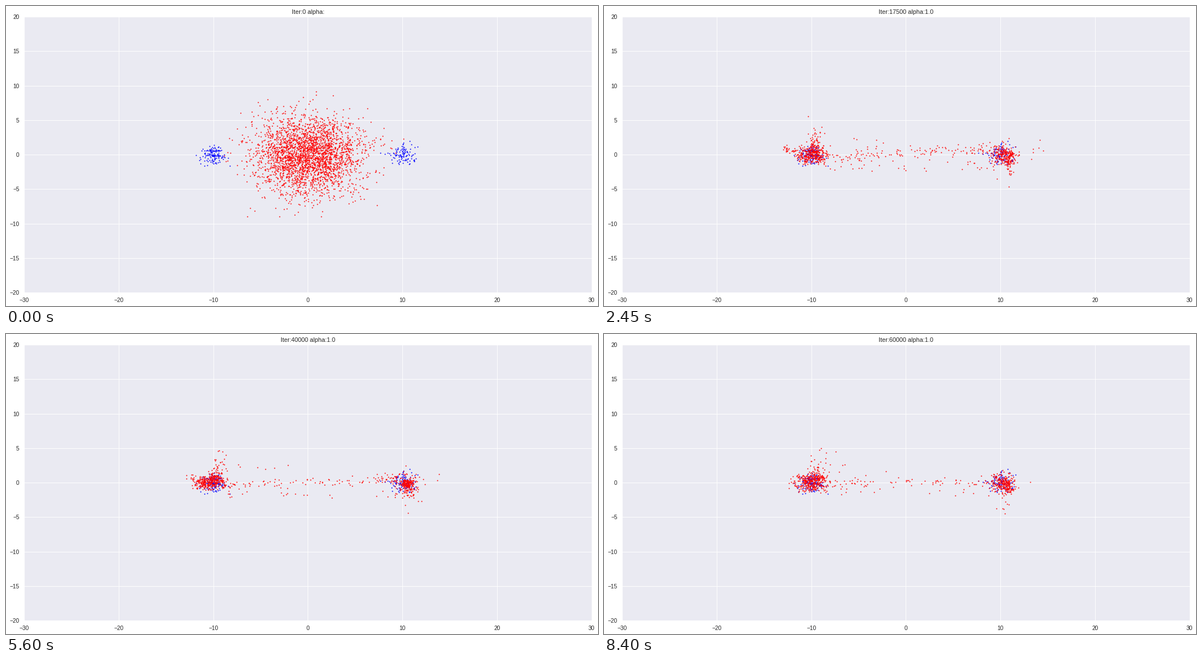
Animation of 1050 by 533 pixels, one loop 8.47 s. Source, as a matplotlib script:

```python
import numpy as np
import matplotlib.pyplot as plt
from matplotlib.animation import FuncAnimation

W, H, DPI = 1050, 533, 64
FRAMES, STEP_MS = 121, 70
INK, PANEL = "#262626", "#eaeaf2"

# Shape of the sampled cloud at a few moments; values between are interpolated.
KEYS = [19, 35, 61, 80, 96, 120]
SHAPE = {
    "lx":     [-11.4, -10.0, -10.3, -10.4, -10.3, -10.2],
    "lsx":    [.9, .8, .95, .9, .85, .9],
    "lsy":    [.8, .65, .65, .55, .6, .7],
    "spur_x": [-11.4, -9.7, -9.9, -9.8, -9.8, -9.7],
    "spread": [.75, .35, .5, .4, .45, .6],
    "lean":   [.5, .05, .02, .12, .15, .14],
    "rise":   [1.7, 1.3, 1.15, 1.1, 1.0, 1.05],
    "ltail":  [8, 32, 12, 10, 0, 0],
    "rx":     [10.6, 10.5, 10.7, 10.5, 10.35, 10.4],
    "ry":     [-.2, -.15, -.25, -.1, .05, -.1],
    "core":   [.75, .6, .28, .33, .42, .5],
    "tilt":   [0, -.3, -.1, -.1, 0, -.6],
    "rtail":  [45, 6, 2, 3, 0, 1],
    "mid_n":  [230, 190, 160, 130, 125, 105],
    "mid_y":  [.1, .25, .15, .05, .05, 0],
    "slope":  [-.01, .06, .05, .06, .05, .03],
    "band":   [1.1, .5, .35, .35, .35, .4],
    "low":    [.3, .14, .13, .12, .12, .06],
}


def px(v):
    """Pixels to points."""
    return v * 72 / DPI


def blob(rng, n, cx, cy, sx, sy):
    """Round cluster with a soft limit on its size."""
    z = 2.6 * np.tanh(rng.normal(size=(2, n)) / 2.4)
    return np.array([cx + sx * z[0], cy + sy * z[1]])


def left_part(rng, p):
    body = blob(rng, 290, p["lx"], 0, p["lsx"], p["lsy"])
    up = rng.exponential(p["rise"], 105)
    up = np.where(up > 5.4, up / 2, up)
    spur = [p["spur_x"] + p["lean"] * up + rng.normal(0, p["spread"], 105),
            .3 + up]
    n = int(p["ltail"])
    t = rng.random(n)
    tail = [-11.2 - 1.8 * t, .2 + .8 * t + rng.normal(0, .25, n)]
    return [body, spur, tail]


def right_part(rng, p):
    core = blob(rng, 150, p["rx"], p["ry"], p["core"], p["core"])
    core[1] += p["tilt"] * (core[0] - p["rx"])
    halo = blob(rng, 85, p["rx"] - .15, -.1, .75, .8)
    down = [p["rx"] + .3 + rng.normal(0, .45, 30),
            -.9 - np.minimum(rng.exponential(.95, 30), 5)]
    up = [10.3 + rng.normal(0, .45, 6), .9 + rng.exponential(.7, 6)]
    n = int(p["rtail"])
    t = rng.random(n)
    tail = [12.7 + 1.5 * t + rng.normal(0, .35, n),
            -.2 + 1.8 * t + rng.normal(0, .6, n)]
    return [core, halo, down, up, tail]


def bridge(rng, p):
    n = int(p["mid_n"])
    x = -8.8 + 18.2 * rng.beta(.7, .6, n)
    y = p["mid_y"] + p["slope"] * x + rng.normal(0, p["band"], n)
    low = rng.random(n) < p["low"]
    y = np.where(low, -1.75 + rng.normal(0, .3, n), np.clip(y, -2.2, 2.1))
    stray = [rng.uniform(-8.5, -2, 6), rng.uniform(1, 2.8, 6)]
    return [[x, y], stray]


def far_points(rng, k):
    nl, nr = rng.poisson(.8), rng.poisson(1.3)
    reach = .7 + 1.6 * np.exp(-k / 25)
    left = [-12 - rng.exponential(.6, nl), rng.normal(.8, .6, nl)]
    right = [11.8 + rng.exponential(reach, nr), rng.normal(-.8, 1.2, nr)]
    return [left, right]


def red_points(k):
    rng = np.random.default_rng(500 + k)
    if k == 0:
        return np.clip(rng.normal(0, 2.8, (2, 2900)), [[-10.5], [-9]], [[10.3], [9.3]])
    p = {name: np.interp(k, KEYS, vals) for name, vals in SHAPE.items()}
    parts = left_part(rng, p) + right_part(rng, p) + bridge(rng, p)
    pts = np.hstack([np.asarray(q) for q in parts + far_points(rng, k)])
    # The first steps stretch the cloud sideways before it settles in two groups.
    mix = np.exp(-k / 4)
    pts[0] *= 1 + np.exp(-((k - 4) / 4.5) ** 2)
    pts *= 1 - mix
    return pts + mix * rng.normal(0, 2.8, pts.shape)


def blue_points():
    rng = np.random.default_rng(7)
    left = rng.normal([[-9.95], [0]], .75, (2, 110))
    right = rng.normal([[10.1], [.05]], .75, (2, 105))
    rows = [rng.uniform(-10.7, -9.1, 32), np.repeat([.6, -.15], 16)]
    pts = np.hstack([left, right, rows])
    pts[1] = np.clip(pts[1], -1.9, 2)
    return pts


plt.rcParams["font.family"] = "Liberation Sans"
fig = plt.figure(figsize=(W / DPI, H / DPI), dpi=DPI, facecolor="white")
ax = fig.add_axes([32.3 / W, (H - 509.2) / H, 1006.3 / W, 490 / H],
                  facecolor=PANEL)
ax.set(xlim=(-30, 30), ylim=(-20, 20),
       xticks=range(-30, 31, 10), yticks=range(-20, 21, 5))
ax.tick_params(length=0, pad=px(8.7), labelsize=px(10.1), labelcolor=INK)
ax.grid(color="white", linewidth=px(.92))
ax.set_axisbelow(True)
for side in ax.spines.values():
    side.set(color="white", linewidth=px(1.1))

dots = dict(linestyle="", marker="o", markersize=px(1.95), markeredgewidth=0)
ax.plot(*blue_points(), color="blue", **dots)
red, = ax.plot([], [], color="red", **dots)
title = ax.set_title("", fontsize=px(10.9), color=INK, pad=px(5.5))


def draw(k):
    red.set_data(*red_points(k))
    title.set_text(f"Iter:{500 * k} alpha:{'1.0' if k else ''}")
    return red, title


anim = FuncAnimation(fig, draw, frames=FRAMES, interval=STEP_MS,
                     repeat=True, repeat_delay=0, blit=False)
plt.show()
```
